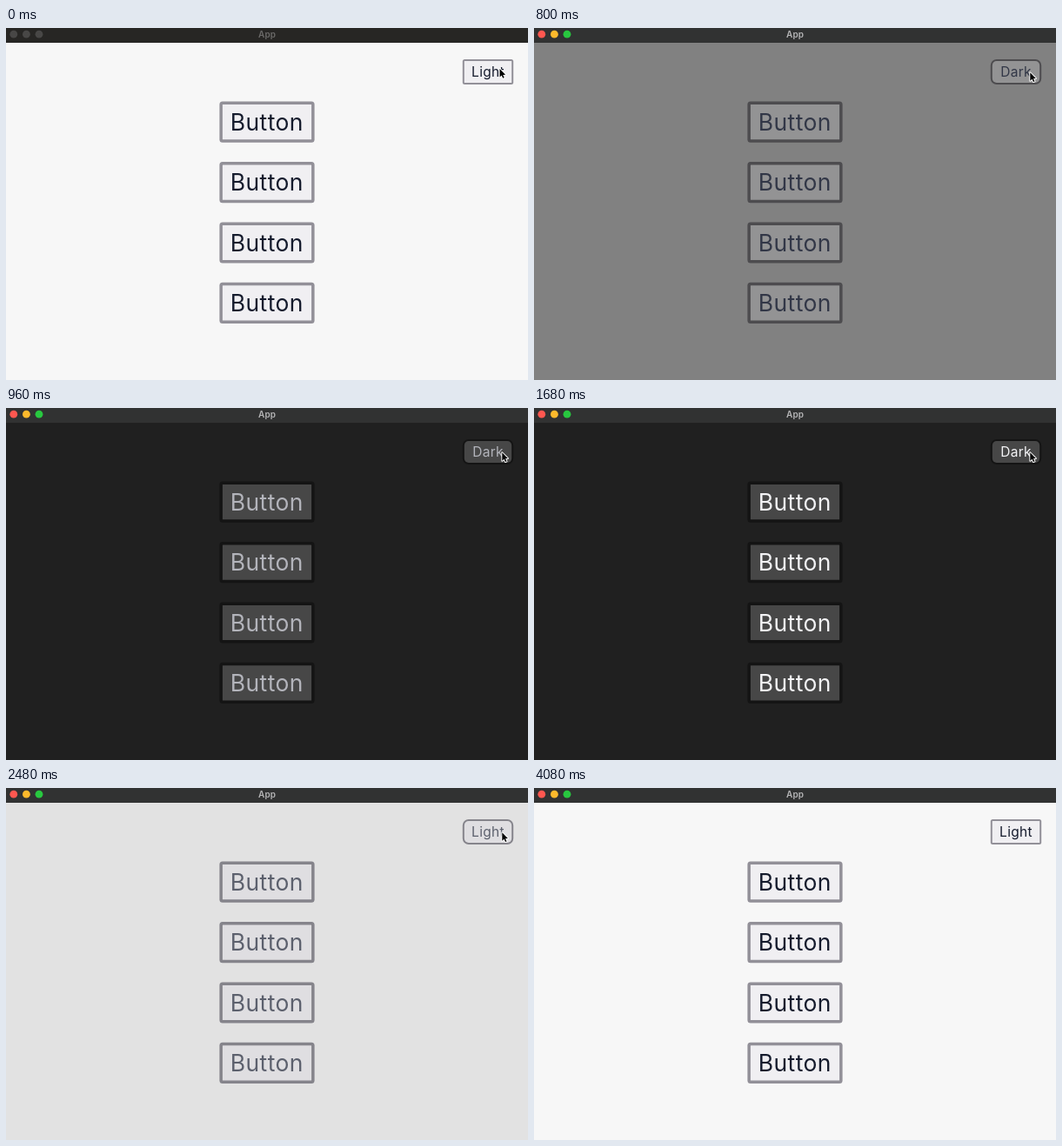
An HTML page with a canvas that plays this animation: 600 by 405 pixels, repeating every 4.32 s.

```html
<!DOCTYPE html>
<html lang="en">
<head>
<meta charset="utf-8">
<title>Theme switch</title>
<style>
  html, body { margin: 0; width: 100%; height: 100%; overflow: hidden; background: #f7f7f7; }
  canvas { display: block; width: 600px; height: 405px; }
</style>
</head>
<body>
<canvas id="stage" width="600" height="405"></canvas>
<script>
const ctx = document.getElementById('stage').getContext('2d');
const LOOP = 4320, STEP = 80;
const FOCUS = 240, TO_DARK = 800, TO_LIGHT = 2320, LEAVE = 3600, GONE = 3680;

// Each colour runs from the light theme to the dark one.
const theme = {
  page: [[247, 247, 247], [32, 32, 32]],
  fill: [[240, 239, 242], [71, 71, 71]],
  edge: [[146, 144, 152], [20, 20, 20]],
  text: [[21, 27, 45], [243, 243, 245]]
};
// Progress of each fade, one value per step; labels lag behind surfaces.
const fades = {
  dark: { surface: [.55, .88, 1], label: [.13, .45, .71, .88, .97, 1] },
  light: { surface: [.13, .656, .9, .985, 1], label: [.04, .42, .68, .86, .96, 1] }
};
const pointer = [
  [240, 567.5, 47], [320, 568.5, 48], [480, 570, 51], [560, 570.3, 51.3],
  [3360, 570.3, 51.3], [3440, 569, 47], [3520, 562, 35], [3600, 550, 18]
];

const clamp = v => Math.max(0, Math.min(1, v));
const lerp = (a, b, p) => a + (b - a) * p;
const smooth = p => p * p * (3 - 2 * p);

function mix([a, b], p) {
  return `rgb(${a.map((v, i) => Math.round(lerp(v, b[i], p))).join(',')})`;
}

function darkness(t, part) {
  if (t < TO_DARK) return 0;
  const back = t >= TO_LIGHT;
  const steps = fades[back ? 'light' : 'dark'][part];
  const i = Math.floor((t - (back ? TO_LIGHT : TO_DARK)) / STEP);
  const p = steps[Math.min(i, steps.length - 1)];
  return back ? 1 - p : p;
}

function pointerAt(t) {
  const next = pointer.findIndex(k => k[0] > t);
  if (next === 0) return pointer[0].slice(1);
  if (next < 0) return pointer[pointer.length - 1].slice(1);
  const a = pointer[next - 1], b = pointer[next];
  const p = (t - a[0]) / (b[0] - a[0]);
  return [lerp(a[1], b[1], p), lerp(a[2], b[2], p)];
}

function rounded(x, y, w, h, r, color) {
  ctx.fillStyle = color;
  ctx.beginPath();
  ctx.roundRect(x, y, w, h, r);
  ctx.fill();
}

function label(text, x, y, font, color, spacing = 0) {
  ctx.font = font;
  ctx.letterSpacing = spacing + 'px';
  ctx.fillStyle = color;
  ctx.fillText(text, x, y);
}

function button(x, y, w, h, border, radius, c) {
  rounded(x, y, w, h, radius, c.edge);
  rounded(x + border, y + border, w - 2 * border, h - 2 * border,
    Math.max(.5, radius - border), c.fill);
}

function titleBar(active) {
  ctx.fillStyle = active ? '#313232' : '#272624';
  ctx.fillRect(0, 0, 600, 17);
  const lights = active ? ['#ff5750', '#fdb92c', '#28c83f'] : Array(3).fill('#484746');
  lights.forEach((color, i) => {
    ctx.fillStyle = color;
    ctx.beginPath();
    ctx.arc(8.8 + i * 14.6, 7.2, 4.4, 0, Math.PI * 2);
    ctx.fill();
  });
  label('App', 300, 10.5, '600 10px Inter, sans-serif', active ? '#b6b6b7' : '#6b6a69');
}

function drawPointer([x, y]) {
  ctx.save();
  ctx.translate(x, y);
  ctx.beginPath();
  [[0, 0], [0, 9.4], [2.2, 7.4], [3.7, 10.8], [5.2, 10.1], [3.7, 6.9], [6.6, 6.7]]
    .forEach(p => ctx.lineTo(...p));
  ctx.closePath();
  ctx.lineJoin = 'round';
  ctx.lineWidth = 1.9;
  ctx.strokeStyle = '#fff';
  ctx.stroke();
  ctx.fillStyle = '#000';
  ctx.fill();
  ctx.restore();
}

function draw(t) {
  const surface = darkness(t, 'surface');
  const c = {
    page: mix(theme.page, surface),
    fill: mix(theme.fill, surface),
    edge: mix(theme.edge, surface),
    text: mix(theme.text, darkness(t, 'label'))
  };
  ctx.fillStyle = c.page;
  ctx.fillRect(0, 0, 600, 405);
  ctx.textAlign = 'center';
  titleBar(t >= FOCUS);

  for (let i = 0; i < 4; i++) {
    const y = 84.6 + i * 69.4;
    button(245.4, y, 109.2, 47.2, 3.5, 3.5, c);
    label('Button', 299.8, y + 33.2, '400 26.5px Inter, sans-serif', c.text, .4);
  }

  const hover = smooth(clamp((t - FOCUS + STEP) / 320)) - smooth(clamp((t - LEAVE) / 320));
  button(524.8, 36, 58.4, 29, 2, lerp(2.5, 7, hover), c);
  const name = t >= TO_DARK && t < TO_LIGHT ? 'Dark' : 'Light';
  label(name, 554, 56, '400 15.5px Inter, sans-serif', c.text, .3);

  if (t < GONE) drawPointer(pointerAt(t));
}

const start = performance.now();
function tick() {
  const t = (performance.now() - start) % LOOP;
  draw(Math.floor(t / STEP) * STEP);
  requestAnimationFrame(tick);
}
tick();
</script>
</body>
</html>
```
